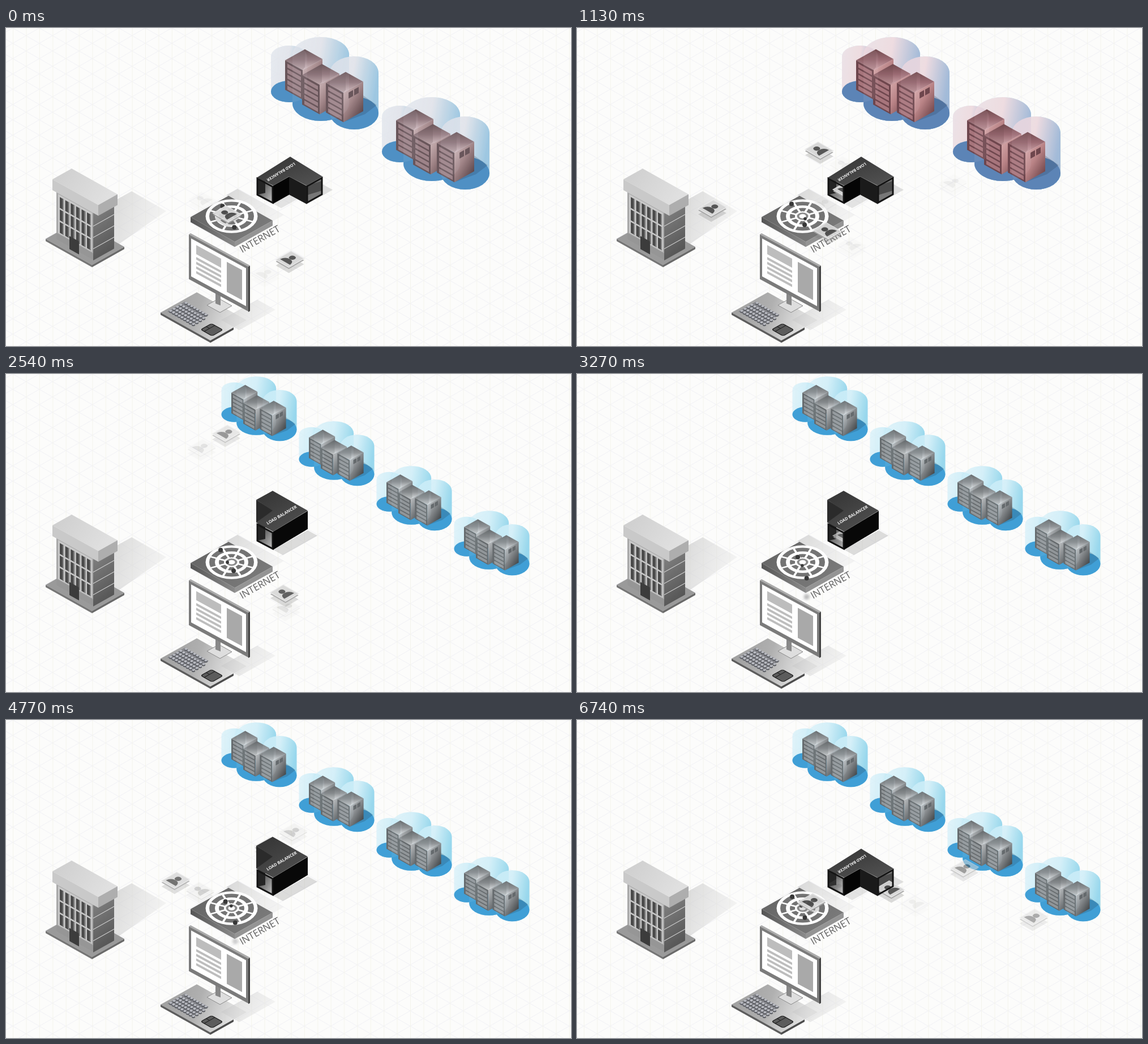
Write an HTML page that moves like this. It is 998 px wide and 561 px high and loops after 6770 ms.

```html
<!DOCTYPE html>
<html lang="en">
<head>
<meta charset="utf-8">
<title>Load balancing</title>
<style>
html, body { margin: 0; width: 100%; height: 100%; overflow: hidden; background: #fcfcfb; }
svg { display: block; width: 998px; height: 561px; }
text { font-family: "Open Sans", "Noto Sans", sans-serif; }
</style>
</head>
<body>
<svg id="stage" viewBox="0 0 998 561"></svg>
<script>
const LOOP = 6770, STEP = 47.083, STRIDE = 50, SLOPE = .56;
const clamp = v => Math.max(0, Math.min(1, v));
const ramp = (t, a, b) => clamp((t - a) / (b - a));
const times = (n, f) => Array.from({ length: n }, (_, i) => f(i)).join('');

// ---- drawing helpers ----
const poly = (pts, fill, more = '') => `<polygon points="${pts}" fill="${fill}" ${more}/>`;
const rect = (x, y, w, h, fill, more = '') =>
  `<rect x="${x}" y="${y}" width="${w}" height="${h}" fill="${fill}" ${more}/>`;
const oval = (x, y, rx, ry, fill) => `<ellipse cx="${x}" cy="${y}" rx="${rx}" ry="${ry}" fill="${fill}"/>`;
const group = (transform, body) => `<g transform="${transform}">${body}</g>`;
const named = (id, body) => `<g id="${id}">${body}</g>`;
const fade = (id, x2, y2, ...stops) =>
  `<linearGradient id="${id}" x1="0" y1="0" x2="${x2}" y2="${y2}">` +
  stops.map(([c, o = 1], i) =>
    `<stop offset="${i / (stops.length - 1)}" stop-color="${c}" stop-opacity="${o}"/>`).join('') +
  '</linearGradient>';

// Isometric pieces: u runs down to the right, v runs up to the right.
const wall = (x, y, w, h, slope, fill, more) =>
  poly([x, y, x + w, y + w * slope, x + w, y + w * slope + h, x, y + h], fill, more);
const tile = (x, y, u, v, fill, more) => poly([x, y, x + u, y + u * SLOPE,
  x + u + v, y + (u - v) * SLOPE, x + v, y - v * SLOPE], fill, more);
const box = (x, y, u, v, h, [top, left, right]) => tile(x, y, u, v, top) +
  wall(x, y, u, h, SLOPE, left) + wall(x + u, y + u * SLOPE, v, h, -SLOPE, right);

// ---- server clusters ----
const palettes = {
  blue: { base: '#3398d2', light: '#d0eef7', side: '#8dd3ea', face: '#5b5e60', drawer: '#8b8e90',
          wall: ['#d2d3d4', '#7d7f81', '#2c2e30'], top: ['#5c5e60', '#8a8c8e', '#e4e5e6'] },
  red: { base: '#4f7db2', light: '#f1dadd', side: '#9bb6d6', face: '#633a40', drawer: '#a06c73',
         wall: ['#dcb0b0', '#b47c7e', '#5e3236'], top: ['#653c40', '#94626a', '#cda3a7'] }
};

function server(x, y, p, name) {
  return box(x, y, 31, 35, 52, [`url(#${name}Top)`, p.face, `url(#${name}Wall)`]) +
    times(5, i => wall(x + 4, y + 6 + i * 9.7, 24, 6.8, SLOPE, p.drawer)) +
    poly([x, y, x + 35, y - 19, x + 35, y + 12, x + 31, y + 17], p.top[0], 'opacity=".25"');
}

function cluster(name) {
  const p = palettes[name];
  const parts = [[500, 50, 112, 32, 19], [556, 47, 133, 50, 31], [615, 79, 150, 43, 29]];
  const glass = (more, [x, top, low, rx, ry]) =>
    `<path d="M${x - rx} ${top}A${rx} ${ry} 0 0 1 ${x + rx} ${top}V${low}A${rx} ${ry} 0 0 1 ${x - rx} ${low}Z" ${more}/>`;
  const glasses = more => parts.map(c => glass(more, c)).join('');
  return fade(name + 'Glass', 1, .25, [p.light, .6], [p.light, .9], [p.side, .95]) +
    fade(name + 'Wall', .8, 1, ...p.wall.map(c => [c])) +
    fade(name + 'Top', 0, 1, ...p.top.map(c => [c])) +
    named(name, group('translate(-468 -15)', glasses(`fill="url(#${name}Glass)"`) +
      parts.map(([x, , low, rx, ry]) => oval(x, low, rx, ry, p.base)).join('') +
      poly([596, 166, 631, 119, 655, 136, 634, 152], '#123', 'opacity=".2"') +
      server(493, 57, p, name) + server(523, 83, p, name) + server(565, 97, p, name) +
      times(2, i => wall(605 + i * 10, 114 - i * 5.6, 8, 10.5, -SLOPE, p.face)) +
      glasses(`fill="${p.light}" opacity=".08"`)));
}

// ---- scenery ----
const grid = `<pattern id="grid" width="46.8" height="27" patternUnits="userSpaceOnUse" x="12">
  <path d="M0 0L46.8 27M0 27L46.8 0" stroke="#f1f1f5"/><path d="M.5 0V27M23.9 0V27" stroke="#f4f4ec"/>
  </pattern>` + rect(0, 0, 998, 561, 'url(#grid)');

const shadows = fade('shade', 1, .3, ['#c4c4c4', .65], ['#e4e4e4', .4]) +
  poly([186, 308, 222, 288, 283, 323, 190, 388], 'url(#shade)') +
  tile(389, 295, 82, 20, 'url(#shade)') + tile(380, 515, 32, 64, 'url(#shade)');

function building() {
  const pane = i => {
    const x = 6 + (i % 6) * 9.6, y = 6 + Math.floor(i / 6) * 22;
    return rect(x, y, 7, 19, '#4a4a4a') + rect(x + 5, y, 2, 19, '#858585');
  };
  return fade('bWall', .3, 1, ['#878787'], ['#565656']) + fade('bRoof', 1, .4, ['#cdcdcd'], ['#e0e0e0']) +
    box(70, 372, 82, 57, 4, ['#9a9a9a', '#767676', '#6a6a6a']) +
    wall(154, 326, 37, 84, -SLOPE, 'url(#bWall)') +
    times(3, i => wall(154, 349 + i * 20, 37, 1.3, -SLOPE, '#cfcfcf')) +
    group(`matrix(1 ${SLOPE} 0 1 89 289)`, rect(0, 0, 65, 84, '#a8a8a8') + rect(3, 2, 60, 69, '#c8c8c8') +
      times(18, pane) + rect(0, 72, 65, 12, '#969696') + rect(23, 65, 17, 23, '#3c3c3c')) +
    box(82, 267, 81, 34, 19, ['url(#bRoof)', '#c9c9c9', '#aeaeae']);
}

function internet() {
  const ring = (r, w, color) => `<circle r="${r}" fill="none" stroke="${color}" stroke-width="${w}"/>`;
  const spoke = i => `<path d="M0 0V-40" stroke="#fff" stroke-width="4" transform="rotate(${22 + i * 45})"/>`;
  return fade('pTop', 1, .6, ['#626262'], ['#7a7a7a']) + fade('pSide', 1, 0, ['#555'], ['#8a8a8a']) +
    box(326, 333.5, 78, 67, 9, ['url(#pTop)', 'url(#pSide)', '#949494']) +
    group('translate(398.5 332) scale(1 .645)', '<circle r="46" fill="#fff"/>' +
      ring(34.5, 10, '#747474') + ring(18, 9, '#747474') + times(8, spoke) + ring(8, 4, '#8a8a8a')) +
    '<text transform="matrix(.87 -.5 .5 .87 417 397)" font-size="17" fill="#606060">INTERNET</text>';
}

function computer() {
  const key = (x, y) => oval(x, y + 1.6, 3, 2.2, '#5a5c62') + oval(x, y, 2.6, 1.8, '#b9bbc2');
  const keys = (rows, cols, x, y) => times(rows * cols, i => {
    const c = i % cols, r = rows - 1 - Math.floor(i / cols);
    return key(x + c * 5 + r * 6, y + c * 2.9 - r * 3.5);
  });
  return fade('desk', 1, .2, ['#9c9c9c'], ['#b0b0b0'], ['#d8d8d8', .6]) +
    tile(273, 502, 88, 64, 'url(#desk)') +
    wall(273, 502, 88, 4, SLOPE, '#5d5d5d') + wall(361, 551.3, 41, 4, -SLOPE, '#4d4d4d') +
    tile(285, 500, 42, 31, '#85868b') + keys(1, 8, 318, 485) + keys(4, 9, 291, 499) +
    group(`matrix(1 ${SLOPE} 1 -${SLOPE} 344 532)`, rect(0, 0, 20, 19, '#5c5c5c',
      'rx="3" stroke="#222" stroke-width="1.3"') + '<path d="M6 0V19M0 9.5H6" stroke="#222"/>') +
    tile(355, 489, 23, 21, '#dedede', 'stroke="#8b8b8b"') +
    wall(370, 466, 9, 20, .4, '#888') +
    poly([323, 364, 326, 362, 431, 419, 428, 421], '#aaa') + wall(428, 421, 3, 80, -.6, '#444') +
    group('matrix(1 .543 0 1 323 364)', rect(0, 0, 105, 79, '#7b7b7b') + rect(4, 5, 97, 67, '#fff') +
      rect(13, 12, 44, 16, '#bdbdbd') + times(4, i => rect(13, 33 + i * 8.2, 44, 4.4, '#bdbdbd')) +
      rect(67, 12, 27, 53, '#a9a9a9'));
}

// ---- load balancer, in two poses ----
const label = (m, size) =>
  `<text transform="matrix(${m})" font-size="${size}" font-weight="700" fill="#f2f2f2">LOAD BALANCER</text>`;
const rim = 'stroke="#141414" stroke-width="3"';
const inletRim = wall(444, 265.5, 27, 28.5, .53, 'none', rim);
const lbBack = fade('tube', 1, 1, ['#222'], ['#777'], ['#ccc']) + fade('lbTop', .7, 1, ['#333'], ['#505050']) +
  named('backA', tile(500, 294, 31, 46, '#aaa', 'opacity=".35"') + tile(472, 310, 14, 28, '#aaa', 'opacity=".3"') +
    wall(531, 278, 28, 32, -SLOPE, '#777') + wall(531, 278, 28, 17, -.3, '#4b4b4b')) +
  named('backB', tile(472, 310, 17, 61, '#aaa', 'opacity=".4"')) +
  wall(443, 264, 29, 31, .53, 'url(#tube)') + wall(443, 264, 15, 30, -.2, '#242424');
const lbFront =
  named('frontA', inletRim + wall(532, 279, 26, 29, -SLOPE, 'none', rim) +
    wall(472, 278, 28, 32, -SLOPE, '#050505') + wall(500, 262, 31, 32, .53, '#1a1a1a') +
    poly([443, 264, 502, 227, 559, 262, 531, 278, 500, 262, 472, 278], 'url(#lbTop)') +
    label('-.86 .52 -.52 -.86 509 237', 6.9)) +
  named('frontB', inletRim + poly([442, 222, 471, 240, 471, 246, 442, 262], '#2b2b2b') +
    wall(472, 278, 61, 32, -.6, '#080808') +
    poly([442, 222, 471, 206, 533, 241, 472, 278, 442, 262, 471, 241], 'url(#lbTop)') +
    label('.87 -.5 .5 .87 462 266', 7.3));

function card(id, axes) {
  const sheet = (dy, fill, more = '', inner = '') => group(`translate(0 ${dy})`,
    group(`matrix(${axes})`, rect(-13.3, -15.5, 26.6, 31, fill, more) + inner));
  return named(id, sheet(10, '#777', 'opacity=".28"') + sheet(3, '#a3a3a3') +
    sheet(0, '#d6d6d6', 'stroke="#e9e9e9" stroke-width="1.5"',
      '<circle cy="-5" r="5" fill="#4a4a4a"/><path d="M-10 10Q-9 0 0 0Q9 0 10 10Z" fill="#4a4a4a"/>'));
}

// ---- traffic ----
const starts = { office: [[200, 340], [306, 279], [396, 331]], desk: [[430, 449], [515, 400], [396, 331]] };
const upper = [512, 264], lower = [503, 269];
const targets = {
  wide: [upper, [410, 205], [500, 153]],
  one: [upper, [312, 148.6], [400, 98]],
  two: [upper, [451, 229], [548, 173]],
  three: [lower, [586, 317], [694, 255]],
  four: [lower, [723, 396], [815, 343]]
};
// Each wave sends cards at an even gap, taking its targets in turn.
const waves = [
  { from: -4.4, to: 26, gap: 2.75, goals: ['three', 'wide'] },
  { from: 29.3, to: 63, gap: 11.1, goals: ['one', 'one', 'four'] },
  { from: 71.5, to: 100, gap: 6.8, goals: ['one', 'two'] },
  { from: 113.7, to: 140, gap: 3.02, goals: ['three', 'four'] }
];
const trips = [];
for (const { from, to, gap, goals } of waves) {
  for (let j = 0; from + j * gap < to; j++) {
    const goal = goals[j % goals.length], start = [1, 4].includes(trips.length % 5) ? 'desk' : 'office';
    trips.push({ at: from + j * gap, up: targets[goal][0] === upper, route: starts[start].concat(targets[goal]) });
  }
}
// The balancer turns shortly before the next card reaches it.
const turnedUp = step => trips.reduce((up, trip) => trip.at + 5.25 <= step ? trip.up : up, false);

function along(points, d) {
  for (let i = 1; i < points.length; i++) {
    const [x, y] = points[i - 1], dx = points[i][0] - x, dy = points[i][1] - y;
    const len = Math.hypot(dx, dy), q = d / len;
    if (q <= 1) {
      const end = i === points.length - 1 ? clamp((len - d) / 20) : 1;
      return { x: x + dx * q, y: y + dy * q, end, kind: dx * dy > 0 ? 'cardU' : 'cardV' };
    }
    d -= len;
  }
  return null;
}

// ---- stage ----
const POOL = 24;
const $ = id => document.getElementById(id);
$('stage').innerHTML =
  `<defs>${cluster('blue')}${cluster('red')}${card('cardV', '.866 .5 -.866 .5 0 0')}${card('cardU', '.866 -.5 .866 .5 0 0')}
  <filter id="soft" x="-1" y="-1" width="3" height="3"><feGaussianBlur stdDeviation="2"/></filter></defs>` +
  grid + shadows +
  times(2, i => `<g id="big${i}"><use href="#blue"/><use href="#red" class="heat"/></g>`) +
  named('smalls', times(4, i => group(`translate(${380.5 + 137 * i} ${3.5 + 79 * i}) scale(.7)`, '<use href="#blue"/>'))) +
  times(2, i => `<circle id="glow${i}" r="5" fill="#bbb" filter="url(#soft)"/>`) +
  internet() + times(3, i => `<circle id="dot${i}" r="${i < 2 ? 4 : 2.8}" fill="#383838"/>`) +
  lbBack + times(POOL, i => `<use id="card${i}"/>`) + lbFront + building() + computer();

const cards = Array.from({ length: POOL }, (_, i) => $('card' + i));
const heat = document.querySelectorAll('.heat');
const set = (el, attrs) => { for (const k in attrs) el.setAttribute(k, attrs[k]); };

// Cards jump one stride per step, blending from one place to the next.
function drawCards(step) {
  const k = Math.floor(step), mix = step - k;
  let used = 0;
  for (const { at, route } of trips) {
    for (const [n, weight] of [[k, 1 - mix], [k + 1, mix]]) {
      const d = (n - at) * STRIDE;
      const p = d >= 0 && weight > .06 && along(route, d);
      if (!p || used >= POOL) continue;
      set(cards[used++], { href: '#' + p.kind, transform: `translate(${p.x} ${p.y})`,
        opacity: weight * clamp(d / 30) * p.end });
    }
  }
  while (used < POOL) set(cards[used++], { opacity: 0 });
}

// Two dots swing in and out in opposite phase; a small one circles the centre.
function drawDots(t) {
  const swing = Math.cos((t - 430) / 1370 * 2 * Math.PI);
  [[35 + 11 * swing, 1.4], [27 - 12 * swing, 4.2]].forEach(([r, angle], i) => {
    const x = 398 + r * Math.cos(angle), y = 332 + r * .64 * Math.sin(angle);
    set($('dot' + i), { cx: x, cy: y });
    set($('glow' + i), { cx: x, cy: y + 33, opacity: ramp(r, 36, 42) });
  });
  set($('dot2'), { cx: 398 + 7 * Math.cos(t / 160), cy: 333 + 5 * Math.sin(t / 160) });
}

function draw(t) {
  const step = t / STEP - .1, up = turnedUp(step);
  drawCards(step);
  drawDots(t);
  for (const part of ['back', 'front']) {
    set($(part + 'A'), { visibility: up ? 'hidden' : 'visible' });
    set($(part + 'B'), { visibility: up ? 'visible' : 'hidden' });
  }
  const red = (.55 + .45 * ramp(t, 0, 480)) * (1 - ramp(t, 1430, 1700));
  heat.forEach(el => set(el, { opacity: red }));
  const gone = ramp(t, 1500, 2000);
  for (let i = 0; i < 2; i++) {
    const x = 468 + 196 * i + (43 - 11 * i) * gone, y = 15 + 106 * i - (40 - 18 * i) * gone;
    set($('big' + i), { transform: `translate(${x} ${y})`, opacity: 1 - ramp(t, 1770, 2010) });
  }
  set($('smalls'), { opacity: ramp(t, 1640, 1940) });
}

function tick() {
  draw(performance.now() % LOOP);
  requestAnimationFrame(tick);
}
tick();
</script>
</body>
</html>
```
